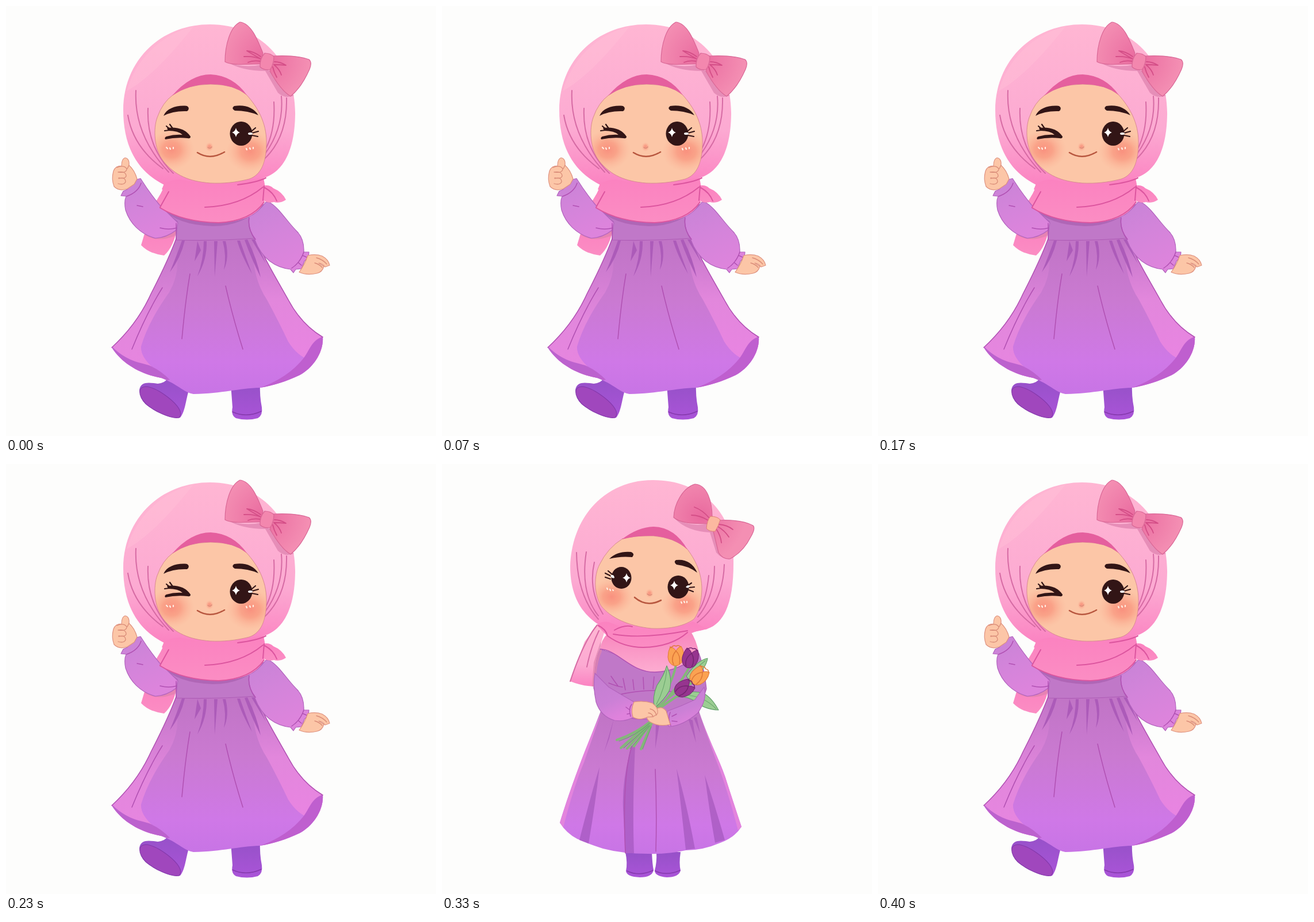
Write an HTML page that moves like this. It is 748 px wide and 748 px high and loops after 0.43 s.

```html
<!DOCTYPE html>
<html lang="en">
<head>
<meta charset="utf-8">
<title>Two poses</title>
<style>
html, body { margin: 0; width: 100%; height: 100%; overflow: hidden; background: #fdfdfc; }
svg { display: block; width: 100%; height: 100%; }
path, ellipse { stroke-linecap: round; stroke-linejoin: round; }

/* hard cut between the poses at 270 ms and 400 ms */
.wave { animation: wave 430ms step-end infinite; }
.hold { animation: hold 430ms step-end infinite; }
@keyframes wave { 0%, 93.0233% { visibility: visible; } 62.7907% { visibility: hidden; } }
@keyframes hold { 0%, 93.0233% { visibility: hidden; } 62.7907% { visibility: visible; } }

.line { fill: none; stroke-width: 1.5; }
.veil { fill: url(#veil); }
.scarf { fill: url(#scarf); }
.band { fill: #e55f9e; }
.fold { stroke: #d66ba4; stroke-width: 2; }
.crease { stroke: #dc559f; stroke-width: 2; }
.skin { fill: #fcc6a7; stroke: #df9381; stroke-width: 1.2; }
.finger { stroke: #d98c78; stroke-width: 1.3; }
.face { fill: #fcc6a7; stroke: #d98a90; stroke-width: 1; }
.blush { fill: url(#blush); }
.ink { fill: #321516; }
.lash { stroke: #321516; stroke-width: 2.2; }
.mouth { stroke: #b8573f; stroke-width: 2.6; }
.shine { fill: #fff; }
.dots { stroke: #fff0e4; stroke-width: 2.2; }
.bow { fill: url(#bow); stroke: #d96695; stroke-width: 1.2; }
.knot { fill: #f387ae; stroke: #d96695; stroke-width: 1.2; }
.bowline { stroke: #d44e87; stroke-width: 1.8; }
.shadow { fill: #df83af; opacity: .75; }
.sleeve { fill: url(#sleeve); stroke: #b263bd; stroke-width: 1.2; }
.top { fill: #c078c8; stroke: #ad5cb5; stroke-width: 1.2; }
.skirt { fill: url(#skirt); }
.pink { fill: url(#side); }
.pleat { fill: #ac5bb9; }
.deep { fill: url(#pleat); }
.seam { stroke: #b050b2; }
.shoe { fill: url(#shoe); }
.shoeline { stroke: #8539ac; }
.sole { fill: #a047bd; stroke: #8539ac; stroke-width: 1.2; }
.leaf { fill: #9bcd92; stroke: #5f9d68; stroke-width: 1.1; }
.stem { fill: none; stroke: #83b878; stroke-width: 4; }
.vein { stroke: #69a56d; stroke-width: 1.1; }
.orange { fill: #fba252; stroke: #df7838; }
.plum { fill: #96348f; stroke: #73246f; }
</style>
</head>
<body>
<svg viewBox="0 0 748 748">
<defs>
  <linearGradient id="veil" x2="0" y2="1">
    <stop stop-color="#ffb6d3"/><stop offset=".65" stop-color="#fcaad2"/><stop offset="1" stop-color="#fb82c1"/>
  </linearGradient>
  <linearGradient id="scarf" x2="0" y2="1">
    <stop stop-color="#fb82c0"/><stop offset="1" stop-color="#fb8dc3"/>
  </linearGradient>
  <linearGradient id="chest" x2="0" y2="1">
    <stop stop-color="#f784bc"/><stop offset="1" stop-color="#fdadd1"/>
  </linearGradient>
  <linearGradient id="sleeveA" x2=".4" y2="1">
    <stop stop-color="#c783d6"/><stop offset=".5" stop-color="#d384da"/><stop offset="1" stop-color="#dd84dc"/>
  </linearGradient>
  <linearGradient id="sleeve" x2=".4" y2="1">
    <stop stop-color="#c47dd2"/><stop offset=".65" stop-color="#cb80d6"/><stop offset="1" stop-color="#df82dc"/>
  </linearGradient>
  <linearGradient id="skirt" x2="0" y2="1">
    <stop stop-color="#c074c5"/><stop offset=".4" stop-color="#ca7ad1"/><stop offset=".8" stop-color="#cf78e7"/><stop offset="1" stop-color="#c874e5"/>
  </linearGradient>
  <linearGradient id="side" x2="0" y2="1">
    <stop stop-color="#da82d5" stop-opacity="0"/><stop offset=".5" stop-color="#e287dc"/><stop offset="1" stop-color="#e984e2"/>
  </linearGradient>
  <linearGradient id="pleat" x2="0" y2="1">
    <stop stop-color="#b363bf"/><stop offset="1" stop-color="#ae5fcb"/>
  </linearGradient>
  <linearGradient id="shoe" x2="0" y2="1">
    <stop stop-color="#9651c8"/><stop offset="1" stop-color="#aa54d8"/>
  </linearGradient>
  <radialGradient id="blush">
    <stop stop-color="#f9917f"/><stop offset=".4" stop-color="#f9977f" stop-opacity=".75"/><stop offset="1" stop-color="#fcb397" stop-opacity="0"/>
  </radialGradient>
  <radialGradient id="bow" gradientUnits="userSpaceOnUse" cx="450" cy="92" r="78">
    <stop stop-color="#e9699e"/><stop offset=".45" stop-color="#ee7ba8"/><stop offset="1" stop-color="#f48fb3"/>
  </radialGradient>
  <path id="star" d="M0-8Q1.5-1.5 7 0 1.5 1.5 0 8-1.5 1.5-7 0-1.5-1.5 0-8Z"/>
  <g id="tulip">
    <path d="M-10-16Q-4-15 0-9 3-15 9-17 17-4 11 10 5 18-3 17-13 14-14 2-14-8-10-16Z"/>
    <path class="line" d="M0-9Q-10 3-4 15M0-9Q9 0 6 14M-9-14Q-4-20 0-17 5-20 8-16"/>
  </g>
  <clipPath id="gown"><path id="gownA" d="M297 402Q365 404 433 399C446 434 468 470 491 511 507 541 529 563 551 576 553 602 534 630 511 642 488 653 466 660 442 664 404 665 378 674 326 675 309 672 299 658 270 647 237 641 203 624 184 594 209 571 234 541 252 501 269 468 284 438 297 402Z"/></clipPath>
  <clipPath id="clipA"><path id="faceA" d="M290 155Q316 136 356 136 397 136 418 154C438 176 453 203 453 236 453 274 443 294 423 301 399 307 379 309 355 308 319 305 294 295 274 270 257 248 256 213 263 194Q272 168 290 155Z"/></clipPath>
  <clipPath id="clipB"><path id="faceB" d="M314 130Q337 124 368 125 403 128 425 146C441 166 452 190 452 218 451 246 445 261 438 270 418 284 391 287 364 286 324 282 293 267 277 247 264 226 264 194 274 175Q288 146 314 130Z"/></clipPath>
</defs>

<g class="wave">
  <!-- shoes -->
  <path class="shoe" d="M232 668C234 652 250 655 264 657Q276 656 284 646L317 672C313 686 311 707 303 716 288 720 251 703 238 687Z"/>
  <path class="sole" d="M233 668C239 656 260 664 281 680 299 694 309 708 301 716 288 719 258 705 243 692Q231 679 233 668Z"/>
  <path class="shoe" d="M391 658L442 656Q441 678 445 698 447 712 438 717 419 722 400 717 391 712 394 698Z"/>
  <path class="line shoeline" d="M394 706Q418 717 444 705"/>

  <!-- trailing scarf -->
  <path class="scarf" d="M241 396L298 385Q292 419 275 434 249 431 235 416Z"/>
  <path class="shadow" d="M241 398L298 387 294 400Q262 412 241 398Z"/>
  <path class="scarf" d="M276 312L300 306 300 352 269 352 261 340Q270 326 276 312Z"/>

  <!-- skirt -->
  <use href="#gownA" class="skirt"/>
  <g clip-path="url(#gown)">
    <path class="pink" d="M292 410Q308 455 284 498 248 548 235 592 233 615 273 643L240 680 150 620 250 430Z"/>
    <path class="pink" d="M430 408Q426 469 454 511 476 552 491 584 503 603 519 612L600 620 560 520 460 400Z"/>
    <path fill="#bc62ce" d="M184 592Q206 615 238 622 262 627 285 650L240 660 170 610Z"/>
    <path fill="#bf5fcf" d="M551 575C529 583 528 602 514 617 493 641 465 656 442 664L510 665 570 600Z"/>
  </g>
  <path class="line seam" d="M184 594C209 571 234 541 252 501 269 468 284 438 297 402M433 399C446 434 468 470 491 511 507 541 529 563 551 576"/>
  <path class="pleat" d="M306 408Q297 434 285 463 304 438 311 408ZM333 409L328 444 339 425ZM344 409Q344 440 333 470 350 441 349 409ZM362 409L363 471 368 409ZM377 409Q384 435 379 459 389 437 382 409ZM402 408Q409 433 428 466 417 437 407 408ZM415 407Q427 440 443 472 437 441 420 406ZM427 406L452 448 433 406Z"/>
  <path class="line seam" d="M320 466Q312 513 306 579M272 490Q244 535 219 597M382 487Q394 540 412 597"/>

  <!-- bodice and sleeves -->
  <path class="top" d="M266 350L450 345 433 404Q365 409 296 407L298 375Z"/>
  <path fill="#a75dad" opacity=".65" d="M272 352Q297 381 360 383 414 383 448 346L425 345 300 345Z"/>
  <g style="--s: url(#sleeveA)">
    <path class="sleeve" style="fill: var(--s)" d="M452 341L459 342C476 352 490 377 507 393Q519 406 518 428L527 428Q527 438 519 444L514 457 504 458 500 464 495 458C469 455 445 440 433 407Q419 385 423 366 438 360 452 341Z"/>
    <path class="line seam" d="M423 369Q420 388 434 406M518 428Q512 446 497 456M516 434L523 437M508 446L514 451"/>
    <path class="skin" d="M525 434Q539 431 550 435 561 441 563 451L555 454Q551 448 544 447L553 453Q550 463 541 465 523 469 510 463Q520 449 525 434Z"/>
    <path class="line finger" d="M540 438Q551 441 558 449M537 447Q545 449 550 455"/>
    <path class="sleeve" style="fill: var(--s)" d="M234 300Q249 324 267 346L299 377 296 390Q279 403 260 404C233 397 215 377 208 355Q205 340 209 331L200 330 204 322 211 319 216 311 223 310 227 302Z"/>
    <path class="line seam" d="M210 331Q230 324 235 308M228 347L238 349M296 378L296 406M268 386Q283 390 297 386"/>
  </g>
  <path class="skin" d="M201 278Q201 266 207 264 215 265 214 277 224 286 228 301L223 310 211 318Q197 323 188 314 183 301 187 287 190 278 201 278Z"/>
  <path class="line finger" d="M193 281Q205 276 210 283 210 291 196 289M195 289Q209 287 209 296 207 301 196 299M196 300Q208 297 208 306 205 312 195 309M214 277L211 283"/>

  <!-- veil -->
  <path class="veil" d="M204 181C204 96 268 32 355 32 443 32 505 99 503 190 502 256 479 294 441 301 408 311 315 316 275 311 225 286 204 240 204 181Z"/>
  <path fill="#ffc4d6" opacity=".35" d="M326 36C268 50 224 95 210 148Q258 122 326 36Z"/>
  <path class="scarf" d="M446 313Q458 310 465 317 480 323 487 337 477 344 466 341 454 344 447 337Z"/>
  <path class="scarf" d="M275 309Q290 301 303 302 357 314 411 304L448 299Q453 320 449 341C438 363 413 375 370 377 324 376 291 365 268 351L283 323 271 319Z"/>
  <path class="line crease" d="M268 351Q308 376 370 377 426 374 449 341M283 323L268 350M346 350Q407 348 447 315M403 311Q436 307 452 299M449 313L447 338M450 316Q465 324 471 339"/>
  <path class="line fold" d="M226 147Q222 224 283 289M212 190Q221 245 273 283M247 178Q244 246 291 291M488 160Q490 239 435 278M479 157Q484 214 447 262M466 167Q469 216 451 250"/>

  <!-- face -->
  <use href="#faceA" class="face"/>
  <g clip-path="url(#clipA)">
    <ellipse class="blush" cx="288" cy="250" rx="40" ry="35"/>
    <ellipse class="blush" cx="425" cy="253" rx="42" ry="36"/>
  </g>
  <path class="band" d="M289 156Q321 119 356 119 395 121 419 155 395 136 356 136 318 136 289 156Z"/>
  <path class="ink" d="M274 191C280 177 299 172 315 174Q321 178 315 183 291 182 274 191ZM397 174Q426 170 439 190 421 182 398 182 391 178 397 174Z"/>
  <path class="ink" d="M280 212Q309 209 321 227 321 231 316 230 296 228 277 232 275 229 279 227 293 223 307 224 300 217 282 217Z"/>
  <path class="line lash" d="M290 213L285 206M285 214L279 209M284 216L276 217M428 217L434 212M428 221L439 218M428 225L438 227"/>
  <ellipse class="ink" cx="409" cy="222" rx="19.5" ry="21"/>
  <use href="#star" class="shine" x="400" y="220"/>
  <ellipse class="shine" cx="425" cy="222" rx="4" ry="2"/>
  <path class="line dots" d="M279 246L281 248M285 247L286 249M291 246L291 248M418 248L419 250M424 247L425 249M430 246L430 248"/>
  <ellipse class="blush" cx="354" cy="245" rx="7" ry="8"/>
  <path class="line finger" d="M351 246Q355 249 358 245"/>
  <path class="line mouth" d="M333 255Q355 269 380 254"/>

  <!-- bow -->
  <path class="shadow" d="M384 97Q412 109 445 102L460 114Q472 142 501 156 485 162 473 151L451 113Q410 113 384 97Z"/>
  <path class="bow" d="M447 82C437 57 426 30 407 28 390 36 381 68 381 97 396 105 427 100 443 101Z"/>
  <path class="bow" d="M465 87Q504 85 527 93 533 98 528 110 514 142 495 157 478 147 459 113Z"/>
  <path class="line bowline" d="M443 88Q431 79 419 78 429 84 443 92 430 87 414 88M442 96Q430 94 421 98M467 97Q477 97 487 103 477 102 466 102 476 110 479 120M464 106Q466 115 471 124"/>
  <path class="knot" d="M450 82Q460 82 466 88 466 100 460 110 450 113 442 106 441 92 450 82Z"/>
</g>

<g class="hold">
  <!-- shoes -->
  <path class="shoe" d="M319 675H365Q366 698 368 706 366 719 344 719 321 718 320 708 323 694 319 675ZM373 675H415Q412 695 415 707 412 719 391 719 370 717 370 707 374 693 373 675Z"/>
  <path class="line shoeline" d="M322 708Q343 718 367 707M371 708Q390 717 414 707"/>

  <!-- skirt -->
  <path class="skirt" d="M276 430H447C465 484 486 520 497 558Q512 605 521 631 509 650 484 659 454 672 424 672 393 679 359 678 314 678 280 669 252 660 235 652 216 642 205 624C218 581 229 552 240 522Z"/>
  <path fill="#e384dd" d="M277 432Q252 488 240 522 224 564 205 624L211 632Q229 561 247 519ZM447 433C465 484 486 520 497 558L521 631 515 637Q495 561 476 513Z"/>
  <path class="deep" d="M330 491Q313 546 315 599L319 677H334Q331 597 336 491ZM274 527Q257 583 239 654L255 660Q267 590 274 527ZM408 530Q416 597 424 671L440 669Q425 588 408 530ZM457 541Q465 603 475 659L492 654Q474 591 457 541Z"/>
  <path class="line seam" d="M371 531Q374 602 372 674M330 491Q313 546 319 677"/>
  <path class="pleat" opacity=".8" d="M299 443L282 501 291 477ZM372 451L371 495 378 454ZM428 442L442 485 436 446ZM438 442L449 468 443 440Z"/>

  <!-- bodice -->
  <path class="top" d="M275 322Q265 341 264 390L280 434Q360 455 446 433L460 391Q455 346 444 323L360 350Z"/>
  <path class="line seam" d="M304 402Q360 389 408 397M332 375L334 393M350 371L351 392M369 370L367 391M387 366L384 391M315 373L319 393"/>

  <!-- veil -->
  <path class="veil" d="M271 279Q278 277 284 287L276 314Q264 345 264 387 243 386 223 378 235 345 248 309Z"/>
  <path class="shadow" d="M276 309L264 345 261 387 267 387Q268 348 278 326Z"/>
  <path class="line fold" d="M273 290Q259 318 252 353M270 280Q246 309 223 378"/>
  <path class="veil" d="M223 178C226 87 288 28 366 28 448 27 509 83 507 166 508 235 494 276 461 287 414 300 326 303 278 283 238 260 223 222 223 178Z"/>
  <path fill="url(#chest)" d="M287 296L431 289Q443 306 447 330 413 361 370 362C327 362 307 324 275 322Q277 306 287 296Z"/>
  <path class="line seam" d="M275 322C306 323 327 362 370 362Q413 361 447 330"/>
  <path class="scarf" d="M270 281Q274 273 290 275 326 291 367 287 408 287 436 274L462 287Q434 291 424 301 391 322 344 320 310 315 287 299Z"/>
  <path class="line crease" d="M288 299Q315 319 350 319 399 318 427 293M298 296Q349 305 427 290M272 281Q285 287 288 299M300 289Q318 279 331 283"/>
  <path class="line fold" d="M234 154Q235 229 272 270M251 153Q240 224 272 264M265 171Q254 219 280 261M491 175Q489 242 444 276M474 178Q474 231 445 266M464 194Q460 234 447 255"/>

  <!-- face -->
  <use href="#faceB" class="face"/>
  <g clip-path="url(#clipB)">
    <ellipse class="blush" cx="295" cy="231" rx="38" ry="32"/>
    <ellipse class="blush" cx="421" cy="245" rx="40" ry="33"/>
  </g>
  <path class="band" d="M313 131Q340 110 368 109 405 110 427 149 404 128 368 125 338 124 313 131Z"/>
  <path class="ink" d="M291 165Q305 151 329 153 336 156 331 162 310 160 291 165ZM407 167Q433 164 444 189 428 177 408 175 402 170 407 167Z"/>
  <path class="line lash" d="M296 192L289 186M294 195L284 190M293 200L284 197M428 211L434 207M429 215L439 214M429 219L437 222"/>
  <ellipse class="ink" cx="312" cy="198" rx="17.5" ry="19"/>
  <ellipse class="ink" cx="411" cy="214" rx="18.5" ry="20"/>
  <use href="#star" class="shine" x="321" y="198"/>
  <use href="#star" class="shine" x="404" y="211"/>
  <path class="shine" d="M293 194Q299 191 300 198 296 200 293 194ZM424 214Q428 209 431 212 429 218 424 214Z"/>
  <path class="line dots" d="M287 216L288 218M292 218L293 220M297 219L298 220M416 240L417 242M421 239L422 241M426 239L426 241"/>
  <ellipse class="blush" cx="361" cy="225" rx="7" ry="8"/>
  <path class="line finger" d="M357 226Q361 230 365 227"/>
  <path class="line mouth" d="M335 232Q356 250 381 237"/>

  <!-- bow -->
  <path class="shadow" d="M405 95Q435 111 466 103L477 119Q482 147 503 164 488 167 477 154L466 119Q426 117 405 95Z"/>
  <path class="bow" d="M470 93C470 67 462 36 440 35 419 41 404 69 403 93 417 105 444 103 462 104Z"/>
  <path class="bow" d="M481 98Q520 96 541 107 546 112 537 127 524 153 501 165 488 166 481 154L472 117Z"/>
  <path class="line bowline" d="M465 94Q453 80 439 75M463 98Q448 89 434 89M482 105Q496 106 506 114M480 109Q492 116 499 127M477 113Q485 125 486 137"/>
  <path fill="#fcb9a0" stroke="#df8178" d="M467 91Q479 91 484 97 481 108 475 117 465 118 460 112 461 98 467 91Z"/>

  <!-- bouquet -->
  <path class="leaf" d="M425 369Q443 342 462 338 460 355 433 381ZM407 406Q431 391 455 399 469 406 481 428 456 427 441 413 423 402 407 406Z"/>
  <path class="stem" d="M407 349Q402 382 367 430M430 354Q410 390 374 427M436 381Q405 393 373 426M413 401L371 430"/>
  <path class="leaf" d="M391 351Q402 376 395 395 386 411 370 424 365 406 374 385 386 368 391 351Z"/>
  <path class="line vein" d="M391 358Q388 390 373 418M458 342Q441 355 429 376M417 402Q453 401 477 426"/>
  <g class="orange">
    <use href="#tulip" x="407" y="334"/>
    <use href="#tulip" transform="translate(447 369) rotate(42)"/>
  </g>
  <g class="plum">
    <use href="#tulip" transform="translate(432 338) rotate(14)"/>
    <use href="#tulip" transform="translate(421 391) rotate(58)"/>
  </g>
  <path class="stem" d="M365 446Q337 469 304 480M363 448L311 494M364 448L322 495M365 448L334 491M366 448L346 496"/>
  <path class="line vein" d="M361 451Q338 472 308 482M360 455L316 494M362 455L327 495M364 457L349 496"/>

  <!-- arms and hands -->
  <path class="sleeve" d="M266 364Q262 385 268 414 276 439 300 446 319 449 334 440L331 428 334 414Q313 402 290 388Z"/>
  <path class="line seam" d="M290 381Q305 387 314 388M294 369Q300 378 306 386M330 418Q324 425 328 439M320 423L327 428M322 435L327 434"/>
  <path class="sleeve" d="M456 388Q462 409 445 433 420 455 395 457L389 448 392 430Q417 421 440 410Z"/>
  <path class="line seam" d="M397 432Q392 443 398 455M400 439L408 435M400 447L409 448"/>
  <path class="skin" d="M373 426Q383 420 390 430L397 453Q376 458 361 448 353 441 359 436Z"/>
  <path class="skin" d="M334 414Q351 411 366 416 377 424 375 434 369 441 358 440 343 447 332 440 328 427 334 414Z"/>
  <path class="line finger" d="M362 426Q371 428 373 437M359 433Q366 434 367 440"/>
</g>
</svg>
</body>
</html>
```
